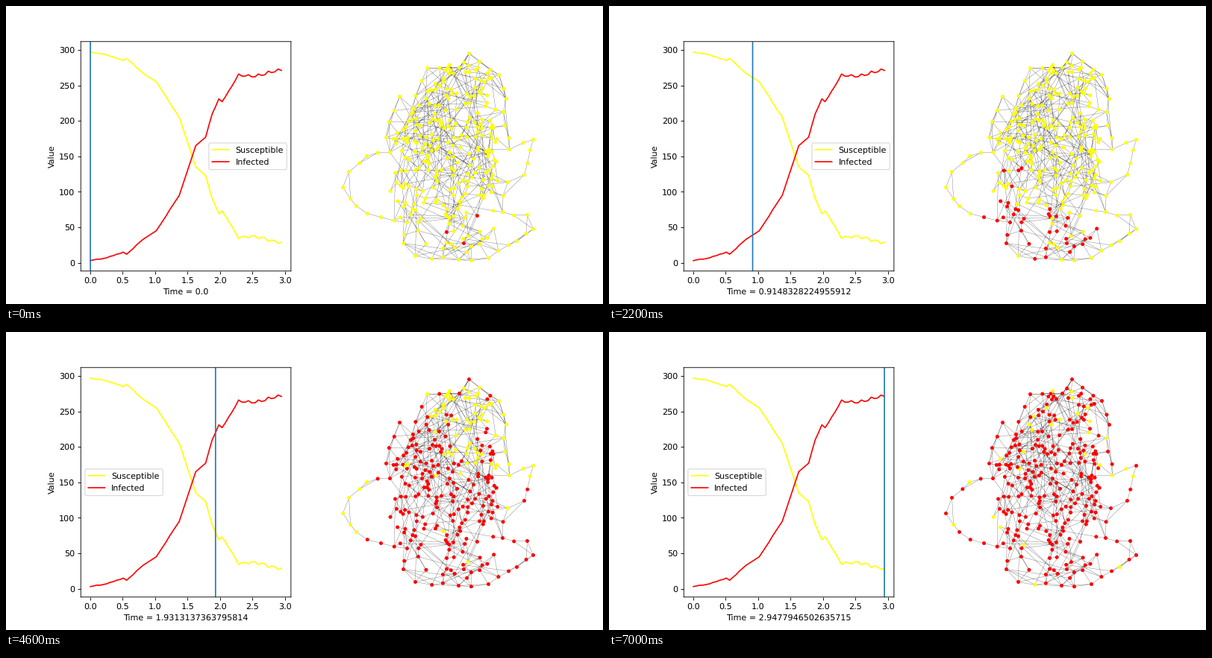
Animation, 800 px wide and 400 px high, one loop 7.1 s. Source, as a matplotlib script:

```python
import random

import matplotlib.pyplot as plt
import numpy as np
from matplotlib.animation import FuncAnimation
from matplotlib.collections import LineCollection

# Smooth, unsnapped drawing, like a larger picture scaled down.
plt.rcParams.update({"path.snap": False, "text.hinting": "no_hinting"})

NODES = 300
FRAMES, INTERVAL = 71, 100
STEPS = 59
STEP = 2.9477946502635715 / (STEPS - 1)
FIRST_CASES = [(631, 281), (590, 303), (613, 318)]

# Corners of the network's rim, clockwise from the top, in stage pixels.
RIM = [(620, 63), (660, 92), (670, 124), (668, 160), (674, 192), (706, 179),
       (694, 226), (672, 236), (665, 276), (698, 280), (706, 299), (684, 315),
       (646, 338), (606, 340), (548, 335), (532, 318), (537, 290), (502, 283),
       (469, 268), (451, 243), (459, 222), (483, 201), (514, 196), (509, 176),
       (527, 121), (545, 137), (564, 83), (607, 82)]

rng = random.Random(5)
steps = np.arange(STEPS)
times = STEP * steps


def infection_curve():
    """Rise between a few turning points, then ripple on a plateau."""
    trend = np.interp(
        steps,
        [0, 5, 10, 11, 16, 20, 27, 32, 35, 37, 39, 40, 45, 50, 58],
        [3, 7, 15, 12, 33, 45, 95, 165, 177, 210, 231, 227, 264, 263, 272])
    ripple = 2 * np.cos(2 * np.pi * steps / 3) * (steps >= 45)
    return np.rint(trend + ripple).astype(int)


def rim_nodes(spacing=17, jitter=3):
    points = []
    for start, end in zip(RIM, RIM[1:] + RIM[:1]):
        start, end = np.array(start), np.array(end)
        parts = max(1, round(np.hypot(*(end - start)) / spacing))
        points.append(start)
        for k in range(1, parts):
            shift = [rng.uniform(-jitter, jitter) for _ in range(2)]
            points.append(start + (end - start) * k / parts + shift)
    return points


def body_nodes(points):
    """Fill the body of the network with random nodes."""
    points = list(points)
    while len(points) < NODES:
        y = np.interp(rng.random(), [0, .1, .22, .5, .75, .9, 1],
                      [75, 115, 150, 200, 245, 285, 330])
        left = np.interp(y, [75, 115, 150, 180, 270, 300, 330],
                         [595, 560, 535, 516, 514, 545, 570])
        right = np.interp(y, [75, 115, 200, 300, 330],
                          [640, 662, 658, 660, 625])
        x = rng.uniform(left, right)
        if all(np.hypot(x - a, y - b) > 3.5 for a, b in points):
            points.append((x, y))
    return np.array(points, float)


def link_nodes(points, rim):
    """Chain the rim and join the body by near and longer links."""
    links = set()

    def link(a, b):
        links.add((min(a, b), max(a, b)))

    first = len(FIRST_CASES)
    for k in range(rim):
        link(first + k, first + (k + 1) % rim)
        if rng.random() < .4:
            link(first + k, first + (k + 2) % rim)

    body = [n for n in range(NODES) if 508 < points[n][0] < 680]
    for n in body:
        dist = np.hypot(*(points - points[n]).T)
        others = sorted((m for m in body if m != n), key=lambda m: dist[m])
        link(n, others[0])
        pool = [m for m in others if dist[m] < 120]
        weights = [np.exp(-dist[m] / 28) for m in pool]
        for m in rng.choices(pool, weights, k=rng.choice([1, 1, 2])):
            link(n, m)
    return sorted(links)


def spread(points, links, counts):
    """Return the infected set at each step, matching the plotted counts."""
    neighbours = [[] for _ in range(NODES)]
    for a, b in links:
        neighbours[a].append(b)
        neighbours[b].append(a)
    distance = np.hypot(*(points - [570, 300]).T)
    sick = set(range(len(FIRST_CASES)))
    history = [sick]
    for i, count in enumerate(counts[1:], 1):
        sick = {n for n in sorted(sick) if rng.random() > .025}
        while len(sick) > count:
            sick.remove(rng.choice(sorted(sick)))
        reach = np.exp(-distance / (15 + 3.5 * i))
        carriers = set(sick)
        while len(sick) < count:
            healthy = [n for n in range(NODES) if n not in sick]
            weights = [(.02 + sum(m in carriers for m in neighbours[n]))
                       * reach[n] for n in healthy]
            sick.add(rng.choices(healthy, weights)[0])
        history.append(sick)
    return history


infected_count = infection_curve()
rim = rim_nodes()
nodes = body_nodes(FIRST_CASES + rim)
edges = link_nodes(nodes, len(rim))
infected = spread(nodes, edges, infected_count)

fig = plt.figure(figsize=(10, 5), dpi=80)
chart = fig.add_axes([100.25 / 800, 44.25 / 400, 281.6 / 800, 308 / 400])
chart.plot(times, NODES - infected_count, color="yellow", label="Susceptible")
chart.plot(times, infected_count, color="red", label="Infected")
marker = chart.axvline(0, color="C0")
chart.set_ylabel("Value")
chart.legend(loc="best")

# The network is laid out in stage pixels.
network = fig.add_axes([0, 0, 1, 1])
network.set_axis_off()
network.set_xlim(-.5, 799.5)
network.set_ylim(399.5, -.5)
network.add_collection(LineCollection(
    [nodes[list(edge)] for edge in edges], colors="black", linewidths=.2))
dots = network.scatter(*nodes.T, s=20, linewidths=0, zorder=3)


def update(frame):
    # Each step lasts 120 ms, shown on a 100 ms clock.
    i = min(int((frame + .5) / 1.2), STEPS - 1)
    marker.set_xdata([times[i]] * 2)
    chart.set_xlabel(f"Time = {times[i]}")
    dots.set_facecolor(["red" if n in infected[i] else "yellow"
                        for n in range(NODES)])


animation = FuncAnimation(fig, update, frames=FRAMES, interval=INTERVAL,
                          init_func=lambda: None, repeat=True, repeat_delay=0)
plt.show()
```
